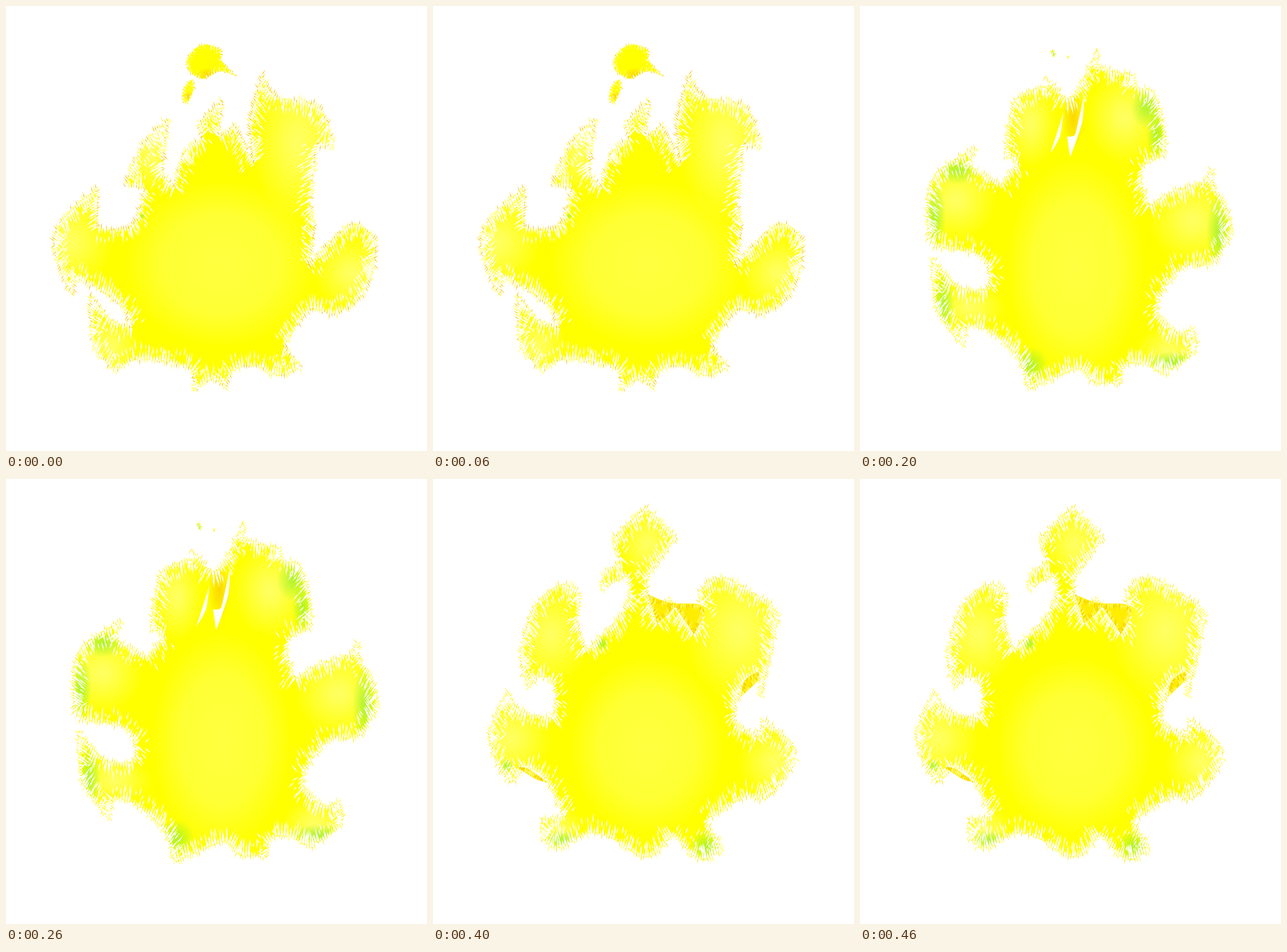
Write an HTML page with a canvas that moves like this. It is 677 by 716 pixels and loops after 500 ms.

```html
<!DOCTYPE html>
<html lang="en">
<head>
<meta charset="utf-8">
<title>Yellow flame</title>
<style>
  html, body { margin: 0; width: 100%; height: 100%; overflow: hidden; background: #fff; }
  canvas { display: block; }
</style>
</head>
<body>
<canvas id="stage" width="677" height="716"></canvas>
<script>
const WIDTH = 677, HEIGHT = 716, HOLD = 100;
const CORE = { rgb: '255,255,68', strength: .95, plateau: .6 };
const PALE = { rgb: '255,255,125', strength: .8, plateau: .25 };
const GREEN = { rgb: '150,240,50', strength: .75, plateau: .25 };
const GOLD = { rgb: '250,195,0', strength: .65, plateau: .25 };

function seeded(seed) {
  return () => {
    seed = (seed * 1664525 + 1013904223) >>> 0;
    return seed / 4294967296;
  };
}

// Joins the corners with curves; tight corners stay pointed.
function smooth(points) {
  const corners = points.trim().split(/\s+/).map(pair => pair.split(',').map(Number));
  const at = i => corners[(i + corners.length) % corners.length];
  const tangent = i => {
    const [px, py] = at(i - 1), [x, y] = at(i), [qx, qy] = at(i + 1);
    const before = Math.hypot(x - px, y - py), after = Math.hypot(qx - x, qy - y);
    const turn = ((x - px) * (qx - x) + (y - py) * (qy - y)) / (before * after);
    if (turn < .25) return [0, 0];
    const scale = Math.min(before, after) / Math.hypot(qx - px, qy - py);
    return [(qx - px) * scale, (qy - py) * scale];
  };
  const line = [];
  corners.forEach((from, i) => {
    const to = at(i + 1), leave = tangent(i), arrive = tangent(i + 1);
    for (let k = 0; k < 8; k++) {
      const t = k / 8, s = t * t * (3 - 2 * t);
      const a = t * (1 - t) * (1 - t), b = t * t * (t - 1);
      line.push([0, 1].map(c => from[c] * (1 - s) + to[c] * s + leave[c] * a + arrive[c] * b));
    }
  });
  return line;
}

function tracePath(line) {
  const path = new Path2D();
  line.forEach(([x, y]) => path.lineTo(x, y));
  path.closePath();
  return path;
}

function walkOutline(line, step, visit) {
  let travelled = 0;
  line.forEach(([x, y], i) => {
    const [nextX, nextY] = line[(i + 1) % line.length];
    const ex = nextX - x, ey = nextY - y, length = Math.hypot(ex, ey);
    if (!length) return;
    const nx = -ey / length, ny = ex / length;
    // Streaks lean towards the vertical, like fur.
    const lx = nx * .65, ly = ny + (ny < -.1 ? -.5 : .5), lean = Math.hypot(lx, ly);
    for (; travelled < length; travelled += step) {
      const t = travelled / length;
      visit(x + ex * t, y + ey * t, lx / lean, ly / lean, nx, ny);
    }
    travelled -= length;
  });
}

// Tapered streak, widest at the fraction `belly` of its length.
function streak(ctx, x, y, dx, dy, length, width, belly, colour) {
  const bx = x + dx * length * belly, by = y + dy * length * belly;
  const wx = -dy * width / 2, wy = dx * width / 2;
  ctx.fillStyle = colour;
  ctx.beginPath();
  ctx.moveTo(x, y);
  ctx.lineTo(bx + wx, by + wy);
  ctx.lineTo(x + dx * length, y + dy * length);
  ctx.lineTo(bx - wx, by - wy);
  ctx.fill();
}

function fringe(ctx, line, size, edge, random) {
  walkOutline(line, 4.6, (x, y, dx, dy) => {
    const length = (7 + 22 * random() ** 1.6) * size;
    streak(ctx, x - dx, y - dy, dx, dy, length, 3.9 * Math.sqrt(size), .12, '#fff');
  });
  walkOutline(line, 6, (x, y, dx, dy, nx, ny) => {
    const depth = (5 + 11 * random()) * size;
    streak(ctx, x + nx * depth, y + ny * depth, dx, dy, (7 + 12 * random()) * size, 2 * size, .4, '#fff');
  });
  walkOutline(line, 4, (x, y, dx, dy) => {
    const inset = 5 * random() * size;
    const colour = random() < .45 ? `rgb(${edge})` : '#ffff20';
    streak(ctx, x + dx * inset, y + dy * inset, -dx, -dy, (3 + 9 * random()) * size, 1.3, .35, colour);
  });
}

class Flame {
  constructor(seed, edge) {
    this.canvas = document.createElement('canvas');
    this.canvas.width = WIDTH;
    this.canvas.height = HEIGHT;
    this.ctx = this.canvas.getContext('2d');
    this.random = seeded(seed);
    this.edge = edge;
    this.shapes = [];
  }

  shape(points, size = 1) {
    const line = smooth(points);
    this.shapes.push({ line, size });
    this.ctx.fillStyle = '#ff0';
    this.ctx.fill(tracePath(line));
    return this;
  }

  glow({ rgb, strength, plateau }, x, y, rx, ry = rx) {
    const { ctx } = this;
    const fade = ctx.createRadialGradient(0, 0, 0, 0, 0, 1);
    fade.addColorStop(0, `rgba(${rgb},${strength})`);
    fade.addColorStop(plateau, `rgba(${rgb},${strength * .8})`);
    fade.addColorStop(1, `rgba(${rgb},0)`);
    ctx.save();
    ctx.globalCompositeOperation = 'source-atop';
    ctx.translate(x, y);
    ctx.scale(rx, ry);
    ctx.fillStyle = fade;
    ctx.fillRect(-1, -1, 2, 2);
    ctx.restore();
    return this;
  }

  finish() {
    this.shapes.forEach(({ line, size }) => fringe(this.ctx, line, size, this.edge, this.random));
    return this.canvas;
  }

  speckle(points) {
    const { ctx, random } = this, line = smooth(points), path = tracePath(line);
    ctx.save();
    ctx.clip(path);
    ctx.fillStyle = '#ffed00';
    ctx.fill(path);
    walkOutline(line, 3, (x, y, dx, dy) => {
      streak(ctx, x, y, dx, dy, 4 + random() * 8, 1.5, .4, random() < .5 ? '#ffffa0' : '#f5ca00');
    });
    ctx.restore();
  }

  cut(points) {
    this.ctx.fillStyle = '#fff';
    this.ctx.fill(tracePath(smooth(points)));
  }
}

function hoodedFlame() {
  const flame = new Flame(71, GOLD.rgb);
  flame.shape(`412,110 436,146 503,163 527,230 499,222 490,325 497,355 486,418 520,380
    559,350 592,375 590,425 565,475 528,495 488,490 447,548 476,580 440,595 405,580 369,585
    352,615 330,601 301,620 295,583 215,568 175,588 140,545 136,463 170,505 203,516 185,480
    112,433 108,468 77,368 148,292 148,355 200,354 223,292 190,288 220,222 261,180 251,265
    270,291 285,237 315,213 310,187 348,153 342,211 368,190 398,255 392,185`);
  flame.shape('290,95 294,79 316,62 345,70 347,88 370,113 345,105 318,117 297,108', .35);
  flame.shape('283,150 287,130 299,118 304,128 292,157', .35);
  flame.glow(CORE, 345, 415, 155, 135).glow(PALE, 470, 220, 75, 130).glow(PALE, 103, 380, 70);
  flame.glow(PALE, 168, 548, 48).glow(PALE, 555, 430, 60).glow(PALE, 235, 235, 38, 65);
  flame.glow(GREEN, 219, 338, 5).glow(GOLD, 326, 111, 22, 12).glow(GOLD, 293, 145, 8);
  return flame.finish();
}

function greenTippedFlame() {
  const flame = new Flame(1068, '255,238,0');
  flame.shape(`363,66 378,126 425,132 478,160 492,225 505,295 438,387 480,372 497,363 511,335
    530,354 575,361 560,430 517,510 522,475 505,466 462,510 455,548 468,570 430,600 391,577
    388,610 360,622 318,598 278,631 243,576 180,550 157,555 165,587 110,525 92,455 157,487
    162,450 130,406 78,385 85,315 110,275 163,235 156,266 192,288 190,255 215,175 255,165
    268,148 272,218 317,146 312,184 348,213 347,180 330,153 340,90`);
  flame.shape('280,45 291,44 303,57 313,58 309,70 281,69', .35);
  flame.shape('274,109 279,107 277,119', .35);
  flame.glow(CORE, 315, 395, 145, 150).glow(PALE, 425, 190, 70).glow(PALE, 145, 520, 40);
  flame.glow(PALE, 115, 315, 42, 55).glow(PALE, 235, 218, 35, 50).glow(GOLD, 360, 185, 17, 42);
  flame.glow(GREEN, 474, 202, 21, 49).glow(GREEN, 486, 286, 25, 36).glow(GREEN, 438, 360, 34);
  flame.glow(GREEN, 564, 407, 28, 50).glow(GREEN, 87, 374, 21, 27).glow(GREEN, 130, 527, 22, 52);
  flame.glow(GREEN, 434, 584, 35, 23).glow(GREEN, 292, 59, 18, 13);
  return flame.finish();
}

function curledFlame() {
  const flame = new Flame(2065, '255,235,0');
  flame.shape(`382,68 388,100 437,110 445,131 472,138 490,200 488,237 452,265 466,321 500,300
    555,280 565,264 572,295 598,355 565,415 520,420 480,470 482,500 510,525 535,519 540,555
    490,590 455,575 425,580 420,608 375,605 351,583 270,618 252,562 200,520 171,515 167,548
    122,485 116,405 160,452 204,455 209,424 185,398 120,385 108,350 118,275 187,228 178,256
    225,288 256,252 232,241 250,150 306,128 298,112 329,150 346,142`);
  flame.shape('306,72 311,71 314,78 310,82', .35);
  flame.shape('332,81 336,80 335,85', .35);
  flame.glow(CORE, 347, 420, 112, 175).glow(PALE, 425, 180, 60, 75).glow(PALE, 275, 190, 42, 70);
  flame.glow(PALE, 155, 312, 65).glow(PALE, 535, 345, 70).glow(PALE, 175, 485, 60, 38);
  flame.glow(PALE, 495, 555, 50, 40).glow(GOLD, 343, 180, 18, 49).glow(GREEN, 462, 162, 27, 36);
  flame.glow(GREEN, 477, 207, 17, 43).glow(GREEN, 156, 264, 36, 23).glow(GREEN, 120, 338, 18, 54);
  flame.glow(GREEN, 134, 480, 18, 55).glow(GREEN, 577, 365, 20, 68).glow(GREEN, 503, 573, 48, 17);
  flame.glow(GREEN, 273, 578, 30).glow(GREEN, 310, 77, 8);
  const canvas = flame.finish();
  flame.cut('329,151 326,175 306,237 322,208');
  flame.cut('360,145 357,188 338,243 333,210 346,207');
  return canvas;
}

function roundedFlame() {
  const flame = new Flame(3062, '255,225,0');
  flame.shape(`354,62 358,85 410,85 433,128 410,165 403,195 432,250 468,320 485,280 525,230
    575,245 592,305 550,375 520,408 522,380 495,400 485,464 515,460 540,438 560,460 545,525
    512,552 490,535 440,560 445,600 425,612 380,585 315,580 290,600 226,612 240,575 268,541
    200,522 153,499 158,545 105,465 97,435 105,400 140,402 199,445 212,425 180,362 142,368
    115,340 125,250 180,192 215,205 240,270 280,223 252,218 253,155 270,132 312,133`);
  flame.glow(CORE, 350, 400, 120, 165).glow(CORE, 350, 205, 60, 120).glow(PALE, 175, 275, 72, 88);
  flame.glow(PALE, 540, 305, 78, 100).glow(PALE, 405, 125, 43, 53).glow(PALE, 145, 455, 80, 65);
  flame.glow(PALE, 520, 492, 62, 50).glow(PALE, 258, 580, 46).glow(GREEN, 190, 222, 18, 10);
  flame.glow(GREEN, 116, 420, 14, 25).glow(GREEN, 132, 492, 12).glow(GREEN, 546, 486, 17, 40);
  const canvas = flame.finish();
  flame.speckle('150,370 179,365 207,394 213,430 194,420');
  flame.speckle('470,298 480,275 492,270 491,300');
  flame.speckle('232,244 277,224 263,251 237,267');
  return canvas;
}

function toweringFlame() {
  const flame = new Flame(4059, '255,230,0');
  flame.shape(`341,45 370,70 392,95 350,151 343,183 361,232 380,190 420,249 433,230 430,180
    468,158 540,200 555,225 527,352 524,310 500,330 485,365 487,393 522,416 530,387 578,425
    580,460 535,515 505,510 438,550 467,595 440,612 420,608 385,571 345,608 290,580 250,570
    200,595 175,575 175,545 212,545 180,480 150,462 125,490 90,420 121,340 140,372 190,385
    198,360 190,325 165,318 155,336 140,290 160,210 203,170 235,185 232,230 246,276 305,215
    317,184 312,155 270,178 273,155 300,130 288,98`);
  flame.glow(CORE, 345, 430, 125, 145).glow(PALE, 492, 245, 88, 115).glow(PALE, 190, 250, 65, 82);
  flame.glow(PALE, 345, 105, 50, 60).glow(PALE, 125, 417, 66).glow(PALE, 550, 455, 60);
  flame.glow(PALE, 200, 565, 42).glow(GREEN, 207, 581, 30, 16).glow(GREEN, 440, 592, 28);
  flame.glow(GREEN, 118, 462, 12).glow(GREEN, 272, 265, 12);
  const canvas = flame.finish();
  flame.speckle('345,185 381,199 425,201 437,215 420,250 390,206 361,233');
  flame.speckle('501,324 524,309 523,324 495,351');
  flame.speckle('134,463 153,466 186,489 165,483');
  return canvas;
}

const paintings = [hoodedFlame, greenTippedFlame, curledFlame, roundedFlame, toweringFlame]
  .map(paint => paint());
const stage = document.getElementById('stage').getContext('2d');
const start = performance.now();

function render() {
  const elapsed = performance.now() - start;
  stage.fillStyle = '#fff';
  stage.fillRect(0, 0, WIDTH, HEIGHT);
  stage.drawImage(paintings[Math.floor(elapsed / HOLD) % paintings.length], 0, 0);
  requestAnimationFrame(render);
}
render();
</script>
</body>
</html>
```
